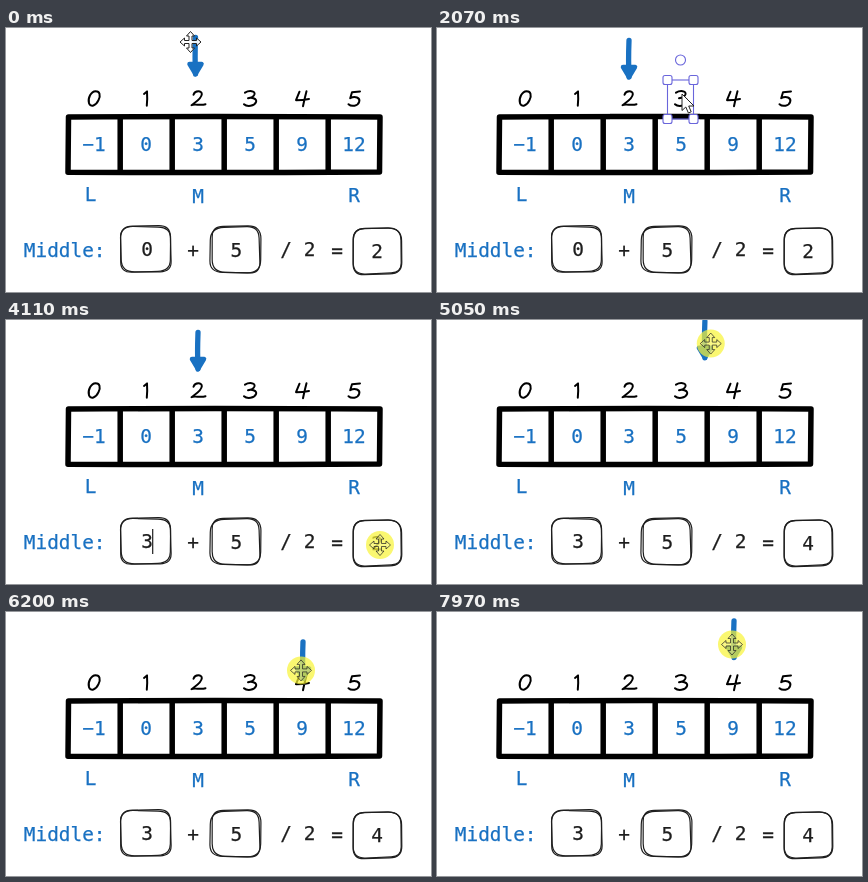
Write an HTML page that moves like this. It is 425 by 264 pixels and loops after 8 s.

```html
<!DOCTYPE html>
<html lang="en">
<head>
<meta charset="utf-8">
<title>Binary search: finding the middle</title>
<style>
  html, body { margin: 0; width: 100%; height: 100%; overflow: hidden; background: #fff; }
  svg { display: block; width: 100vw; height: 100vh; }
  text { font: 19.4px "DejaVu Sans Mono", "Noto Sans Mono", monospace; text-anchor: middle; stroke-width: .25; }
  .blue { fill: #1971c2; stroke: #1971c2; }
  .ink { fill: #1e1e1e; stroke: #1e1e1e; }
  .line { fill: none; stroke-linecap: round; stroke-linejoin: round; }
</style>
</head>
<body>
<svg viewBox="0 0 425 264" xmlns="http://www.w3.org/2000/svg">
  <g class="line" id="digits" stroke="#000" stroke-width="2"></g>
  <g class="line" stroke="#000" stroke-width="5.5">
    <path d="M62.5 89Q200 88 374 89L373.5 144Q210 145 62 144.3Z"/>
    <path id="dividers"/>
  </g>
  <g class="blue" id="labels"></g>
  <g class="ink" id="sum"></g>
  <g class="line" id="boxes" stroke="#1e1e1e" stroke-width="1.2"></g>
  <path id="caret" stroke="#1e1e1e" stroke-width="1.2"/>
  <g class="line" id="arrow" stroke="#1971c2" stroke-width="5.3">
    <path d="M0 -39.5Q-.8 -18 0 -3"/>
    <path d="M-6 -13L0 -3L6 -13Z" fill="#1971c2" stroke-width="4.5"/>
  </g>
  <g id="selection" fill="#fff" stroke="#6965db" stroke-width="1.1">
    <rect id="frame" fill="none"/>
    <circle id="knob" r="5"/>
  </g>
  <circle id="glow" r="14" fill="#f8f435" opacity=".7"/>
  <g id="cursor" fill="#fff" stroke="#222" stroke-linejoin="round">
    <path id="mover"/>
    <path id="pointer" d="M0 0V16.5L3.8 13L6.4 19L9.2 17.8L6.7 12H12Z"/>
  </g>
</svg>
<script>
const LOOP = 8000, LAG = 30;
const $ = id => document.getElementById(id);

function add(parent, tag, attrs, content) {
  const el = document.createElementNS("http://www.w3.org/2000/svg", tag);
  for (const k in attrs) el.setAttribute(k, attrs[k]);
  if (content) el.textContent = content;
  return $(parent).appendChild(el);
}
const write = (parent, x, y, content) => add(parent, "text", { x, y }, content);
const show = (el, on) => el.setAttribute("visibility", on ? "visible" : "hidden");
const place = (el, x, y) => el.setAttribute("transform", `translate(${x} ${y})`);
const cellX = i => 88 + 52 * i;

// Handwritten index digits, each drawn around its own middle
const strokes = [
  "M2 -7.5C-3 -8 -6.5 0 -5 4.5C-3.5 9 2 7 4.5 1.5C6.8 -3.5 6 -7.8 1 -7.3",
  "M-2 -4.8L1 -7.3Q1.5 0 .8 7",
  "M-4.5 -4C-3 -8.5 4 -8.5 3.8 -4.5C3.5 0 -2 3 -6.5 6.5C-3 4.5 2 7.5 7.5 5.5",
  "M-5 -6C-1 -8.5 5.5 -8 4.5 -4.5C3.5 -1.5 0 -.8 -2 -.5C2 -1.5 7.5 0 6 3.5C4.5 7.5 -3 8.5 -6 5.5",
  "M-2.5 -7L-6 1.5Q1 1.5 7 .2M4.5 -7.5Q2.5 0 1 7.5",
  "M6 -7.3L-2 -6.5L-3.8 -.5C1 -3 6.5 -1 5.2 3C4 7.5 -2.5 8.3 -5.5 5.5"
];
strokes.forEach((d, i) => place(add("digits", "path", { d }), cellX(i), 70.7));

["−1", "0", "3", "5", "9", "12"].forEach((v, i) => write("labels", cellX(i), 123, v));
$("dividers").setAttribute("d", [1, 2, 3, 4, 5].map(i => `M${cellX(i) - 25.8} 90v54`).join(""));
write("labels", cellX(0) - 3.5, 173, "L");
write("labels", cellX(2), 174.7, "M");
write("labels", cellX(5), 174, "R");
write("labels", 58.7, 228.8, "Middle:");

const left = write("sum", 141, 228, "0");
write("sum", 187, 229.2, "+");
write("sum", 230.3, 229, "5");
write("sum", 280, 228, "/");
write("sum", 303.7, 228, "2");
write("sum", 331, 229, "=");
const result = write("sum", 371.2, 230, "2");

let seed = 11;
function wobble(size) {
  seed = (seed * 16807) % 2147483647;
  return (seed / 2147483647 - .5) * 2 * size;
}

// A rounded box drawn by hand in two uneven passes
function sketchBox(x, y) {
  for (let pass = 0; pass < 2; pass++) {
    const pts = [[0, 0], [49, 0], [49, 45.5], [0, 45.5]].map(([a, b]) => [x + a + wobble(1.3), y + b + wobble(1.3)]);
    const toward = (a, b, r) => a.map((v, i) => v + (b[i] - v) * r).join(" ");
    const d = pts.map((p, i) => {
      const r = .25 + wobble(.04);
      return `${i ? "L" : "M"}${toward(p, pts[(i + 3) % 4], r)}Q${p} ${toward(p, pts[(i + 1) % 4], r)}`;
    }).join("");
    add("boxes", "path", { d: d + "Z" });
  }
}
sketchBox(115.5, 198.5);
sketchBox(205, 199);
sketchBox(346, 200.2);

const handles = [0, 1, 2, 3].map(() => add("selection", "rect", { width: 9, height: 9, rx: 2 }));

// Four-way move cursor: one arm turned through the quarter circle
function moverPath() {
  const arm = [[-1.5, -1.5], [-1.5, -6], [-4, -6], [0, -10.5], [4, -6], [1.5, -6]];
  const points = [];
  for (let q = 0; q < 4; q++) {
    for (let [x, y] of arm) {
      for (let n = 0; n < q; n++) [x, y] = [-y, x];
      points.push(x + " " + y);
    }
  }
  return "M" + points.join("L") + "Z";
}
$("mover").setAttribute("d", moverPath());

const within = (t, spans) => spans.some(([from, to]) => t >= from && t < to);
const progress = (t, from, to) => Math.min(1, Math.max(0, (t - from) / (to - from)));
const easeOut = p => 1 - (1 - p) ** 2;
const bob = (t, from, to, height) => height * Math.sin(Math.PI * progress(t, from, to));

// The pointer glides from stop to stop: start, end, x, y
const START = [184.5, 14];
const moves = [
  [70, 860, 187, 17],      // nudging the arrow
  [1660, 1800, 245, 66],   // index digit
  [2270, 2970, 134, 213],  // left operand
  [3500, 3640, 172, 240],  // out of the way
  [3970, 4100, 374, 225],  // result
  [4530, 4800, 190, 36],   // arrow
  [4830, 5250, 298, 20],   // drag to the right
  [5320, 5600, 295, 32.5]
];

function cursorAt(t) {
  let [x, y] = START;
  for (const [from, to, nextX, nextY] of moves) {
    const p = easeOut(progress(t, from, to));
    x += (nextX - x) * p;
    y += (nextY - y) * p;
  }
  y += bob(t, 70, 860, 13) + bob(t, 6060, 6800, 46) + bob(t, 6870, 7640, 30);
  return [x, y];
}

// While dragged, the arrow trails the pointer a little
function arrowAt(t) {
  const [x, y] = cursorAt(t - LAG);
  if (t < 1390) return [x + 5, y + 35];
  return t < 4830 ? [192, 52] : [x + 2, y + 16];
}

const presses = [[70, 1320], [1800, 2070], [3170, 3300], [3500, 3570], [4100, 4310], [4830, LOOP]];
const grabs = [[0, 1680], [4070, 4530], [4800, LOOP]];
const selections = [
  { from: 1800, to: 3170, x: 230.5, y: 52, width: 26, height: 39 },
  { from: 3170, to: 3500, x: 109.5, y: 192, width: 61, height: 58 },
  { from: 4180, to: 4510, x: 340, y: 194, width: 62, height: 59 }
];

function drawSelection(t) {
  const s = selections.find(({ from, to }) => t >= from && t < to);
  show($("selection"), s);
  if (!s) return;
  for (const k of ["x", "y", "width", "height"]) $("frame").setAttribute(k, s[k]);
  place($("knob"), s.x + s.width / 2, s.y - 20);
  handles.forEach((h, i) => place(h, s.x - 4.5 + (i % 2) * s.width, s.y - 4.5 + (i >> 1) * s.height));
}

function render(t) {
  const spot = cursorAt(t), pressed = within(t, presses), grab = within(t, grabs);
  place($("arrow"), ...arrowAt(t));
  place($("cursor"), ...spot);
  place($("glow"), ...spot);
  show($("glow"), pressed);
  show($("mover"), grab);
  show($("pointer"), !grab);
  $("mover").setAttribute("fill-opacity", pressed ? .15 : .9);
  $("mover").setAttribute("stroke-opacity", pressed ? .7 : 1);

  drawSelection(t);
  left.textContent = t < 3640 ? "0" : "3";
  result.textContent = t < 4510 ? "2" : "4";
  const editLeft = t >= 3570 && t < 4180, editResult = t >= 4510 && t < 4580;
  show($("caret"), editLeft || editResult);
  $("caret").setAttribute("d", editLeft ? "M146.7 209V234" : "M378 211V236");
}

function tick(now) {
  render(now % LOOP);
  requestAnimationFrame(tick);
}
render(0);
requestAnimationFrame(tick);
</script>
</body>
</html>
```
